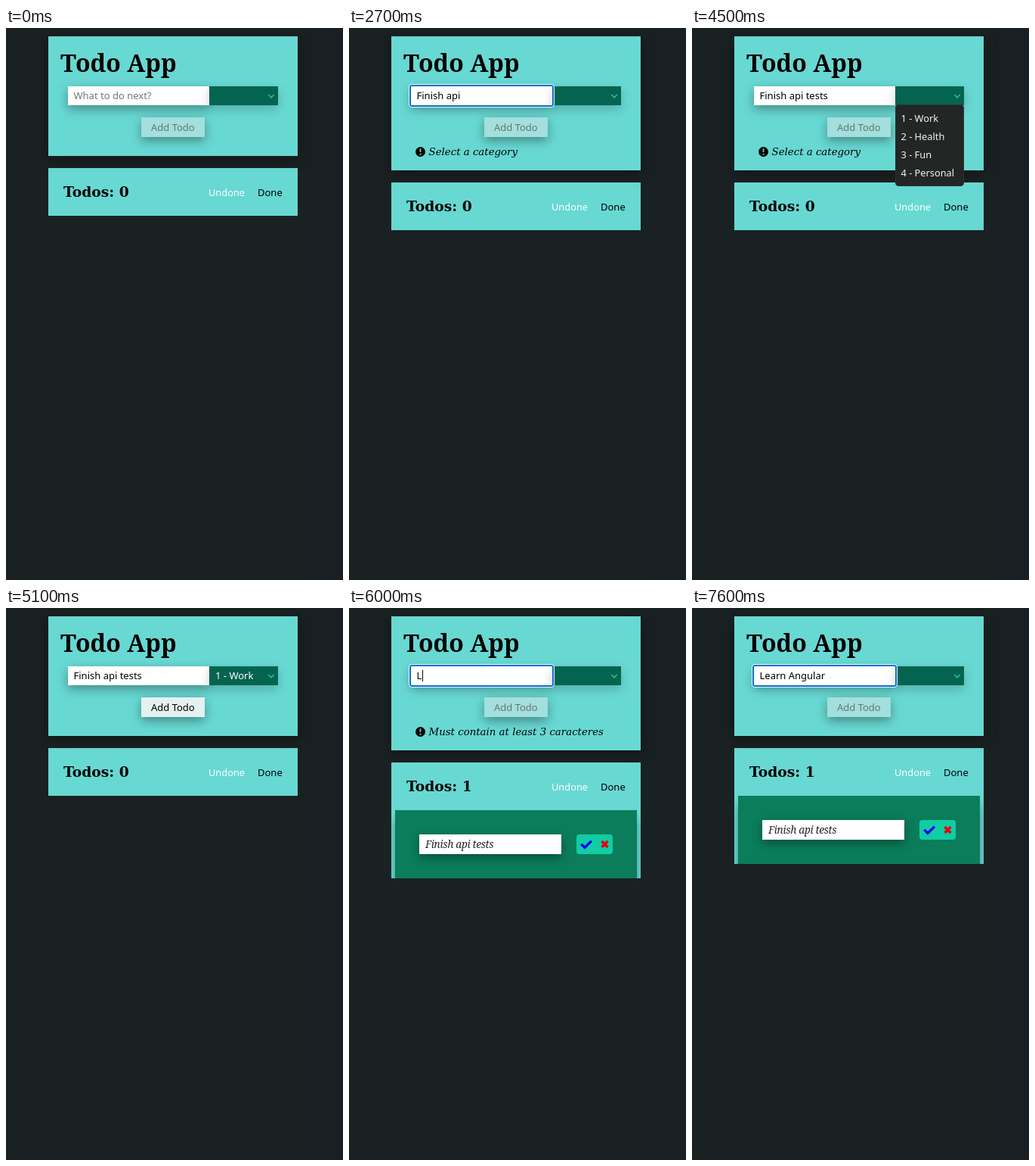
Animation of 446x729 px, one loop 8000 ms. Source, as an HTML page:

```html
<!DOCTYPE html>
<html lang="en">
<head>
<meta charset="utf-8">
<title>Todo App</title>
<style>
  html, body { margin: 0; width: 100%; height: 100%; overflow: hidden; }
  body { position: relative; background: linear-gradient(90deg, #1a2122 396px, #181f25 404px); }
  div, svg { position: absolute; box-sizing: border-box; }
  .card { left: 56px; width: 330px; background: #68d8d3; overflow: hidden; }
  #form { top: 11px; box-shadow: 0 3px 16px rgba(0, 0, 0, .4); }
  .lift { box-shadow: 0 5px 14px rgba(0, 0, 0, .36); }
  #field { left: 82px; top: 77px; width: 187px; height: 25px; background: #fff; }
  #select { left: 269px; top: 77px; width: 91px; height: 25px; background: #05644f;
    box-shadow: 0 5px 14px rgba(0, 0, 0, .2); }
  #ring { left: 80px; top: 75px; width: 191px; height: 29px; border: 2px solid #0b6fcf;
    border-radius: 3px; outline: 1px solid #e8fbfa; }
  #button { left: 179px; top: 118px; width: 84px; height: 26px; background: #a3dfdc; }
  #button.on { background: #e4f1f0; }
  #menu { left: 269px; top: 101px; width: 91px; height: 108px; border-radius: 5px;
    background: #242525; box-shadow: 0 0 0 1px #303232 inset; }
  #panel { left: 5px; top: 63px; width: 320px; height: 90px; background: #0b7d5b;
    box-shadow: 0 12px 12px rgba(0, 0, 0, .32); }
  #task { left: 32px; top: 32px; width: 188px; height: 26px; background: #fff; }
  #tools { left: 240px; top: 32px; width: 48px; height: 26px; border-radius: 4px; background: #10cda4; }
  svg { left: 0; top: 0; width: 446px; height: 729px; }
  text { font: 13px "Noto Sans", "Open Sans", sans-serif; white-space: pre; }
  .title { font: bold 32px "Noto Serif", serif; }
  .count { font: bold 18.72px "DejaVu Serif", serif; }
  .error { font: italic 13.33px "DejaVu Serif", serif; }
  .todo { font: italic 13.6px "Noto Serif", serif; letter-spacing: -.3px; fill: #222; }
  .options text { font-size: 12.8px; fill: #f4f4f4; }
  .hide { display: none; }
</style>
</head>
<body>
<div id="form" class="card"></div>
<div id="field" class="lift"></div>
<div id="select"></div>
<div id="ring"></div>
<div id="button" class="lift"></div>
<div id="list" class="card">
  <div id="panel">
    <div id="task" class="lift"></div>
    <div id="tools"></div>
  </div>
</div>
<div id="menu"></div>
<svg viewBox="0 0 446 729">
  <text class="title" x="72" y="58">Todo App</text>
  <text id="value" x="89.5" y="94"></text>
  <path id="caret" d="M0 82v15" stroke="#000"/>
  <text id="choice" x="277" y="94" fill="#fff"></text>
  <path d="M347.3 88l3.7 3.8 3.7-3.8" fill="none" stroke="#25c39a" stroke-width="1.5"/>
  <text id="add" x="192" y="136">Add Todo</text>
  <g id="alert">
    <circle cx="94.5" cy="163.5" r="6.5"/>
    <path d="M94.5 159.3v4.6m0 1.9v1.9" stroke="#68d8d3" stroke-width="1.8"/>
    <text id="message" class="error" x="105.5" y="168"></text>
  </g>
  <g id="options" class="options"></g>
  <g id="head">
    <text id="count" class="count" x="76" y="223"></text>
    <text x="268" y="222" fill="#fff" style="font-size:12.8px">Undone</text>
    <text x="333" y="222">Done</text>
    <g id="row">
      <text class="todo" x="101" y="298">Finish api tests</text>
      <path d="M307.3 292.8l4.7 4.6 9-8.8" fill="none" stroke="#0000f0" stroke-width="3.4"/>
      <path d="M334.5 289l8 8m0-8l-8 8" stroke="#e00510" stroke-width="3.6"/>
    </g>
  </g>
</svg>
<script>
const $ = id => document.getElementById(id);
const show = (id, on) => $(id).classList.toggle("hide", !on);
const LOOP = 8000;
const SHORT = "Must contain at least 3 caracteres";
const PICK = "Select a category";

const steps = [
  [0, { value: "", focus: false, caret: false, error: "", menu: false, choice: "", todos: 0 }],
  [300, { focus: true, caret: true }],
  [1000, { error: SHORT }],
  [1600, { error: PICK }],
  [2700, { caret: false }],
  [3000, { caret: true }],
  [3900, { caret: false }],
  [4500, { focus: false, menu: true }],
  [5100, { menu: false, choice: "1 - Work", error: "" }],
  [5400, { value: "", choice: "" }],
  [5600, { todos: 1 }],
  [5800, { focus: true, caret: true }],
  [6000, { error: SHORT }],
  [6200, { error: "" }],
  [7600, { caret: false }]
];

// Typing runs: start time and the text added, one letter per 100 ms
const runs = [
  [1000, "F"], [1500, "inish api"], [3000, " t"], [3300, "es"], [3500, "ts"],
  [6000, "Learn An"], [6900, "gu"], [7200, "l"], [7300, "ar"]
];
const pairs = ["ts", "ar"];

function typed(t) {
  const from = t >= 5400 ? 5400 : 0;
  return runs.filter(([at]) => at >= from && at <= t)
    .map(([at, s]) => pairs.includes(s) ? s : s.slice(0, Math.floor((t - at) / 100) + 1))
    .join("");
}

["Work", "Health", "Fun", "Personal"].forEach((name, i) => {
  const el = document.createElementNS("http://www.w3.org/2000/svg", "text");
  el.setAttribute("x", 276.5);
  el.setAttribute("y", 124 + i * 24);
  el.textContent = `${i + 1} - ${name}`;
  $("options").append(el);
});

function render(t) {
  const s = Object.assign({}, ...steps.filter(([at]) => at <= t).map(p => p[1]));
  const value = typed(t);
  const shift = s.error ? 19 : 0;
  const ready = s.choice !== "";

  $("value").textContent = value || (s.focus || t < 5800 || t >= 5800 ? "What to do next?" : "");
  $("value").setAttribute("fill", value ? "#000" : "#757575");
  const x = 90 + (value ? $("value").getComputedTextLength() : 0);
  $("caret").setAttribute("transform", `translate(${Math.round(x) + .5})`);
  show("caret", s.focus && s.caret);
  show("ring", s.focus);

  $("choice").textContent = s.choice;
  $("button").classList.toggle("on", ready);
  $("add").setAttribute("fill", ready ? "#000" : "#667675");
  $("message").textContent = s.error;
  show("alert", s.error);
  show("menu", s.menu);
  show("options", s.menu);

  $("form").style.height = 158 + shift + "px";
  $("list").style.top = 185 + shift + "px";
  $("list").style.height = 63 + 90 * s.todos + "px";
  $("head").setAttribute("transform", `translate(0 ${shift})`);
  $("count").textContent = "Todos: " + s.todos;
  show("panel", s.todos);
  show("row", s.todos);
}

const start = performance.now();
function tick() {
  render((performance.now() - start) % LOOP);
  requestAnimationFrame(tick);
}
tick();
</script>
</body>
</html>
```
